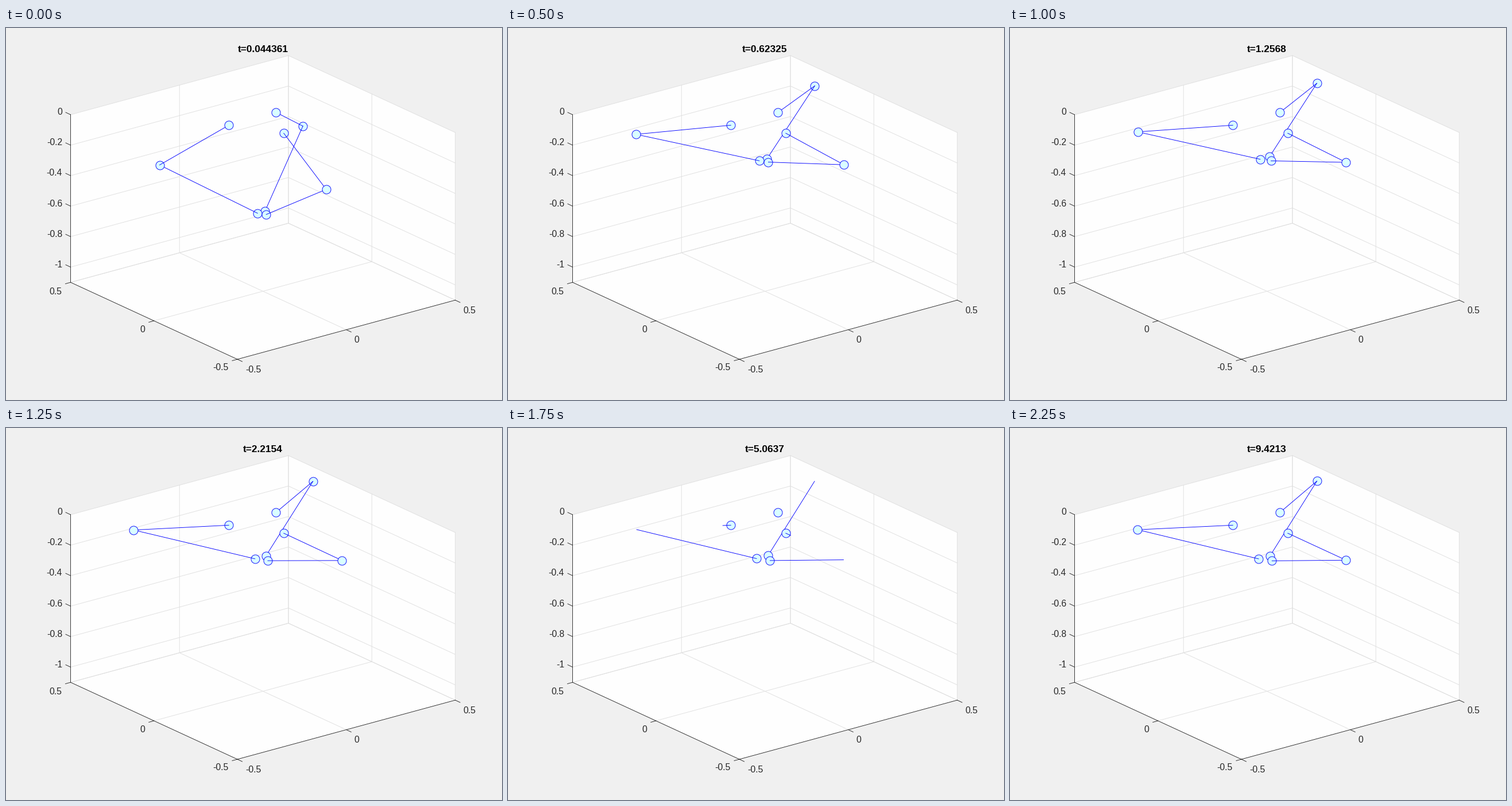
Recreate the animation shown at these times as a matplotlib script. Size 864x648 px, loop 2.3 s.

```python
import numpy as np
import matplotlib.pyplot as plt
from matplotlib.animation import FuncAnimation

W, H, DPI = 864, 648, 100
PX = 72 / DPI
FRAMES, INTERVAL = 46, 50

BASE_R, UPPER, LOWER = 0.125, 0.35, 0.5
Z_MIN, Z_CLIP = -1.1, 0.00017
ANGLES = np.radians([150, 270, 30])
INK, BLUE, CYAN = "#262626", "#0000ff", "#d9ffff"

# Simulated time against frame, then elbow height and platform radius against time
KEY_FRAMES = [0, 4, 10, 20, 29, 35, 45]
KEY_TIMES = [0.044361, 0.26013, 0.62325, 1.2568, 3.2791, 5.0637, 9.4213]
ELBOW_Z = [-0.240, -0.128, -0.031, -0.0147, 0.0033, 0.0020, -0.0005]
PLATFORM_R = [0.0195, 0.0195, 0.0205, 0.0245, 0.0317, 0.0306, 0.0303]


def smooth(x, xs, ys):
    """Monotone cubic interpolation through the given points."""
    xs, ys = np.asarray(xs, float), np.asarray(ys, float)
    h = np.diff(xs)
    d = np.diff(ys) / h
    m = np.concatenate([d[:1], np.zeros(len(d) - 1), d[-1:]])
    for k in range(1, len(d)):
        if d[k - 1] * d[k] > 0:
            w1, w2 = 2 * h[k] + h[k - 1], h[k] + 2 * h[k - 1]
            m[k] = (w1 + w2) / (w1 / d[k - 1] + w2 / d[k])
    i = int(np.clip(np.searchsorted(xs, x, side="right") - 1, 0, len(h) - 1))
    s = (x - xs[i]) / h[i]
    return (ys[i] * (1 + 2 * s) * (1 - s) ** 2 + ys[i + 1] * s * s * (3 - 2 * s)
            + h[i] * (m[i] * s * (1 - s) ** 2 - m[i + 1] * s * s * (1 - s)))


def project(p):
    x, y, z = p
    return np.array([447.5 + 379.5 * x - 290.5 * y,
                     166.5 - 103 * x - 134 * y - 265.5 * z])


def depth(p):
    """Nearness to the viewer."""
    x, y, z = p
    return 0.866 * (-0.609 * x - 0.793 * y) + 0.5 * z / 1.1


def clip_top(a, b):
    """Cut the segment a-b at the upper limit of the box."""
    if max(a[2], b[2]) <= Z_CLIP:
        return a, b
    cut = a + (b - a) * (Z_CLIP - a[2]) / (b[2] - a[2])
    return (cut, b) if a[2] > Z_CLIP else (a, cut)


fig = plt.figure(figsize=(W / DPI, H / DPI), dpi=DPI, facecolor="#f0f0f0")
ax = fig.add_axes([0, 0, 1, 1])
ax.set_xlim(0, W)
ax.set_ylim(H, 0)
ax.axis("off")


def path3d(*points, color="#dfdfdf", zorder=-8):
    xy = np.array([project(p) for p in points])
    ax.plot(xy[:, 0], xy[:, 1], color=color, lw=0.9 * PX, zorder=zorder, snap=False)


def tick(p, dx, dy):
    x, y = project(p)
    ax.plot([x, x + dx], [y, y + dy], color=INK, lw=0.9 * PX, zorder=-6)


def label(x, y, text, ha):
    ax.text(x, y, text, ha=ha, va="center_baseline", color=INK,
            family="Liberation Sans", size=15.8 * PX)


def draw_box():
    lo, hi = -0.5, 0.5
    walls = [
        [(lo, lo, Z_MIN), (hi, lo, Z_MIN), (hi, hi, Z_MIN), (lo, hi, Z_MIN)],
        [(lo, hi, Z_MIN), (hi, hi, Z_MIN), (hi, hi, 0), (lo, hi, 0)],
        [(hi, lo, Z_MIN), (hi, hi, Z_MIN), (hi, hi, 0), (hi, lo, 0)],
    ]
    for wall in walls:
        xy = np.array([project(p) for p in wall])
        ax.fill(xy[:, 0], xy[:, 1], color="#fefefe", lw=0, zorder=-10)

    for z in (0, -0.2, -0.4, -0.6, -0.8, -1, Z_MIN):
        path3d((lo, hi, z), (hi, hi, z), (hi, lo, z))
    for v in (0, hi):
        path3d((v, lo, Z_MIN), (v, hi, Z_MIN), (v, hi, 0))
        path3d((lo, v, Z_MIN), (hi, v, Z_MIN), (hi, v, 0))
    path3d((hi, lo, Z_MIN), (hi, lo, 0))
    path3d((lo, hi, 0), (lo, hi, Z_MIN), (lo, lo, Z_MIN), (hi, lo, Z_MIN),
           color=INK, zorder=-6)

    for k, text in enumerate(["0", "-0.2", "-0.4", "-0.6", "-0.8", "-1"]):
        tick((lo, hi, -0.2 * k), -8.5, -4)
        label(98, 145 + 53.2 * k, text, "right")
    for v, text, x, y in [(0.5, "0.5", 97.5, 457.5), (0, "0", 242, 524.5),
                          (-0.5, "-0.5", 387.5, 590.5)]:
        tick((lo, v, Z_MIN), -9, 2.5)
        label(x, y, text, "right")
    for v, text, x, y in [(-0.5, "-0.5", 417.5, 593.5), (0, "0", 606.5, 542),
                          (0.5, "0.5", 796.5, 491)]:
        tick((v, lo, Z_MIN), 8.5, 4)
        label(x, y, text, "left")


draw_box()
title = ax.text(447.3, 36.5, "", ha="center", va="center_baseline", color="black",
                family="Liberation Sans", weight="bold", size=17.2 * PX)


def make_link():
    return ax.plot([], [], color=BLUE, lw=0.9 * PX)[0]


def make_joint():
    return ax.plot([], [], "o", ms=15 * PX, mfc=CYAN, mec=BLUE,
                   mew=0.9 * PX, snap=False)[0]


links = [[make_link() for _ in range(2)] for _ in ANGLES]
joints = [[make_joint() for _ in range(3)] for _ in ANGLES]


def arm_points(angle, elbow_z, platform_r):
    elbow_r = BASE_R + np.sqrt(UPPER ** 2 - elbow_z ** 2)
    platform_z = elbow_z - np.sqrt(LOWER ** 2 - (elbow_r - platform_r) ** 2)
    c, s = np.cos(angle), np.sin(angle)
    return [np.array([r * c, r * s, z]) for r, z in
            ((BASE_R, 0), (elbow_r, elbow_z), (platform_r, platform_z))]


def update(frame):
    t = smooth(frame, KEY_FRAMES, KEY_TIMES)
    elbow_z = smooth(t, KEY_TIMES, ELBOW_Z)
    platform_r = smooth(t, KEY_TIMES, PLATFORM_R)
    title.set_text(f"t={t:.5g}")

    for angle, arm_links, arm_joints in zip(ANGLES, links, joints):
        pts = arm_points(angle, elbow_z, platform_r)
        for link, a, b in zip(arm_links, pts, pts[1:]):
            xy = np.array([project(p) for p in clip_top(a, b)])
            link.set_data(xy[:, 0], xy[:, 1])
            link.set_zorder(5 + depth((a + b) / 2))
        for joint, p in zip(arm_joints, pts):
            x, y = project(p)
            joint.set_data([x], [y])
            joint.set_zorder(5 + depth(p))
            joint.set_visible(bool(p[2] <= Z_CLIP))
    return []


anim = FuncAnimation(fig, update, frames=FRAMES, interval=INTERVAL,
                     repeat=True, repeat_delay=0, blit=False)
plt.show()
```
